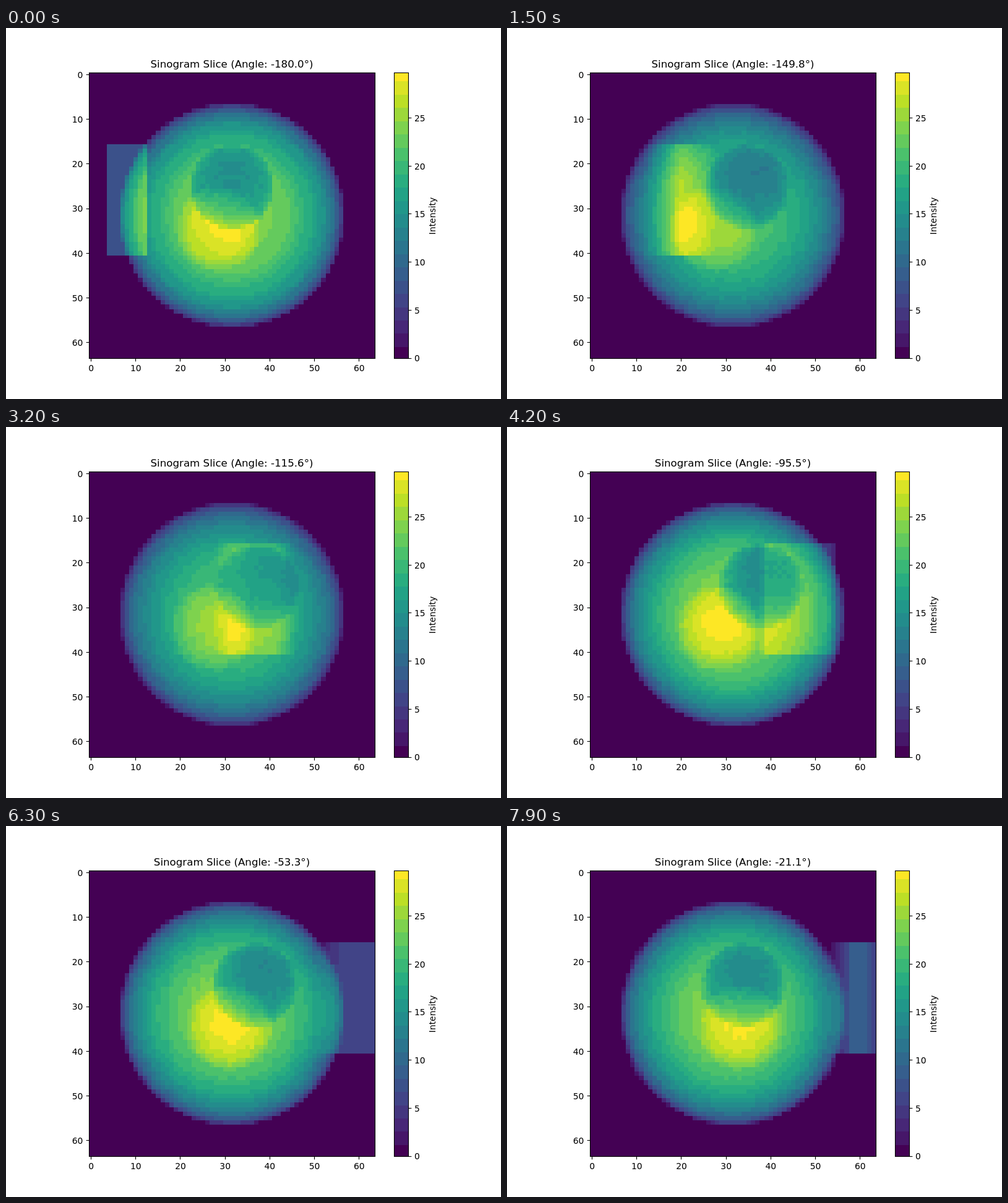
Write an HTML page with a canvas that moves like this. It is 800 px wide and 600 px high and loops after 8000 ms.

```html
<!DOCTYPE html>
<html lang="en">
<head>
<meta charset="utf-8">
<title>Sinogram Slice</title>
<style>
  html, body { margin: 0; width: 100%; height: 100%; overflow: hidden; background: #fff; }
  .stage { position: relative; width: 800px; height: 600px; }
  canvas { position: absolute; left: 134px; top: 72px; width: 462px; height: 462px; image-rendering: pixelated; }
  svg { position: absolute; left: 0; top: 0; }
  text { font: 13.89px "DejaVu Sans", sans-serif; fill: #000; }
  #title { font-size: 16.67px; }
  .mid { text-anchor: middle; }
  .end { text-anchor: end; }
  .line { fill: none; stroke: #000; stroke-width: 1.11; }
</style>
</head>
<body>
<div class="stage">
  <canvas id="map" width="64" height="64"></canvas>
  <svg id="plot" width="800" height="600" viewBox="0 0 800 600">
    <g id="bar" shape-rendering="crispEdges"></g>
    <rect class="line" x="134.5" y="72.5" width="462" height="462"/>
    <rect class="line" x="627.5" y="72.5" width="23" height="462"/>
    <text id="title" class="mid" x="365" y="64"></text>
    <text class="mid" transform="translate(694 304) rotate(-90)">Intensity</text>
  </svg>
</div>
<script>
const N = 64, MID = 31.5, FRAMES = 80, FRAME_MS = 100, STEP = 360 / 179;
const AXES = { left: 134, top: 72, size: 462 };
const BAR_MAX = 29.74;
const FIRST_BAND = 0.039, BAND = 0.0465, LAST = 21;

const plot = document.getElementById('plot');
const title = document.getElementById('title');
const ctx = document.getElementById('map').getContext('2d');
const image = ctx.createImageData(N, N);

// Viridis, in coarse colour bands
const STOPS = ['440154', '482475', '414487', '355f8d', '2a788e', '21918c',
  '22a884', '44bf70', '7ad151', 'bddf26', 'fde725']
  .map(hex => [0, 2, 4].map(i => parseInt(hex.slice(i, i + 2), 16)));

function viridis(v) {
  const p = v * 10, i = Math.min(9, Math.floor(p));
  return STOPS[i].map((a, c) => Math.round(a + (STOPS[i + 1][c] - a) * (p - i)));
}

const bands = Array.from({ length: LAST + 1 }, (_, k) =>
  viridis(k === 0 ? 0 : k === LAST ? 1 : FIRST_BAND + (k - 0.5) * BAND));

function bandOf(v) {
  return v < FIRST_BAND ? 0 : Math.min(LAST, 1 + Math.floor((v - FIRST_BAND) / BAND));
}

// Solid on a unit grid: three balls and a box, densities add up
const balls = [
  { x: 0, y: 0, z: 0, r: 0.8, d: 0.5 },
  { x: 0.1, y: 0.1, z: 0.1, r: 0.3, d: 0.25 },
  { x: 0, y: -0.2, z: -0.2, r: 0.3, d: -0.5 }
];

function density(x, y, z) {
  let sum = 0;
  for (const b of balls) {
    if ((x - b.x) ** 2 + (y - b.y) ** 2 + (z - b.z) ** 2 <= b.r ** 2) sum += b.d;
  }
  const inBox = x > 0.6 && x < 0.9 && y > -0.8 && y < -0.3 && z > -0.5 && z < 0.3;
  return sum + (inBox ? 0.5 : 0);
}

const volume = new Float32Array(N ** 3);
const unit = i => (i - MID) / MID;
for (let z = 0, n = 0; z < N; z++)
  for (let y = 0; y < N; y++)
    for (let x = 0; x < N; x++) volume[n++] = density(unit(x), unit(y), unit(z));

// Parallel rays, stepped along the axis they follow most closely
function project(angle) {
  const c = Math.cos(angle), s = Math.sin(angle);
  const alongY = Math.abs(c) >= Math.abs(s);
  const main = alongY ? c : s, other = alongY ? s : c;
  const across = alongY ? 1 : N, along = alongY ? N : 1;
  const sums = new Float32Array(N * N);
  for (let col = 0; col < N; col++) {
    for (let step = 0; step < N; step++) {
      const pos = (col - MID - (step - MID) * other) / main + MID + 1e-7;
      const lo = Math.floor(pos), f = pos - lo;
      if (lo < 0 || lo >= N - 1) continue;
      let at = lo * across + step * along;
      for (let row = 0; row < N; row++, at += N * N) {
        sums[row * N + col] += volume[at] * (1 - f) + volume[at + across] * f;
      }
    }
  }
  return sums;
}

function draw(frame) {
  const deg = -180 + frame * STEP;
  const sums = project(deg * Math.PI / 180);
  const peak = sums.reduce((a, b) => Math.max(a, b), 0);
  sums.forEach((v, i) => {
    image.data.set(bands[bandOf(v / peak)], i * 4);
    image.data[i * 4 + 3] = 255;
  });
  ctx.putImageData(image, 0, 0);
  title.textContent = `Sinogram Slice (Angle: ${deg.toFixed(1)}°)`;
}

function add(parent, tag, attrs, label) {
  const el = document.createElementNS('http://www.w3.org/2000/svg', tag);
  for (const key in attrs) el.setAttribute(key, attrs[key]);
  if (label !== undefined) el.textContent = label;
  parent.append(el);
}

function tick(x, y, dx, dy) {
  add(plot, 'path', { class: 'line', d: `M${x} ${y}l${dx} ${dy}` });
}

function buildAxes() {
  const { left, top, size } = AXES, bottom = top + size;
  const snap = v => Math.floor(v) + 0.5;
  for (let n = 0; n <= 60; n += 10) {
    const p = (n + 0.5) * size / N;
    tick(snap(left + p), bottom + 0.5, 0, 4.86);
    add(plot, 'text', { class: 'mid', x: left + p, y: 555 }, n);
    tick(left + 0.5, snap(top + p), -4.86, 0);
    add(plot, 'text', { class: 'end', x: 124.3, y: top + p + 5.3 }, n);
  }
  for (let n = 0; n <= 25; n += 5) {
    const y = bottom - n / BAR_MAX * size;
    tick(650.5, snap(y), 4.86, 0);
    add(plot, 'text', { x: 660, y: y + 5.3 }, n);
  }
  const bar = document.getElementById('bar');
  bands.forEach((rgb, k) => {
    const from = k ? FIRST_BAND + (k - 1) * BAND : 0;
    const to = k === LAST ? 1 : FIRST_BAND + k * BAND;
    const y = Math.round(bottom - to * size);
    add(bar, 'rect', { x: 627, y, width: 24, height: Math.round(bottom - from * size) - y, fill: `rgb(${rgb})` });
  });
}

let shown = -1;
const start = performance.now();

function play(now) {
  const frame = Math.floor(Math.max(0, now - start) / FRAME_MS) % FRAMES;
  if (frame !== shown) draw(shown = frame);
  requestAnimationFrame(play);
}

buildAxes();
play(start);
</script>
</body>
</html>
```
